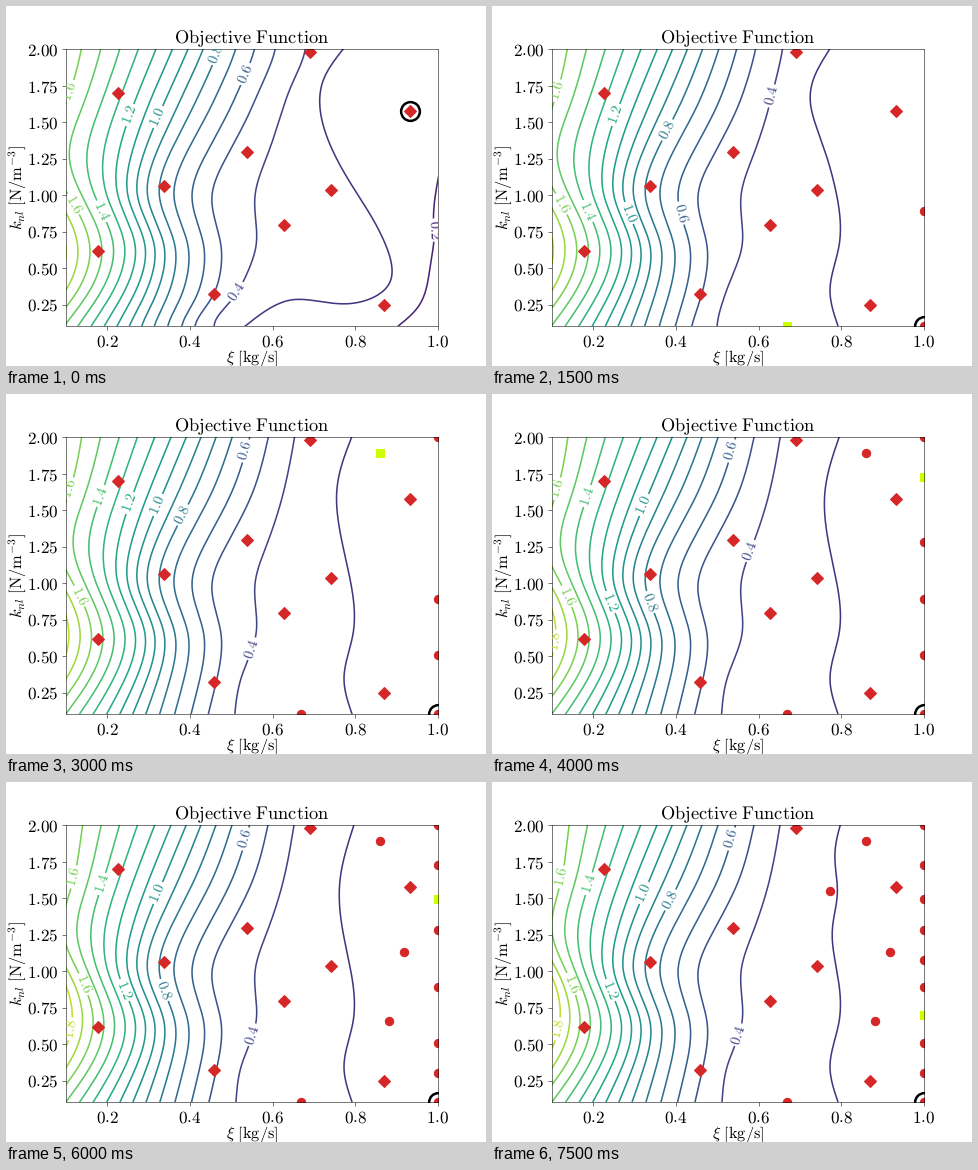
These frames come from a looping animation (480x360 px, 8000 ms). A matplotlib script:

```python
import numpy as np
import matplotlib.pyplot as plt
from matplotlib.animation import FuncAnimation

plt.rcParams.update({
    "mathtext.fontset": "cm", "text.hinting": "none", "axes.linewidth": .5,
    "xtick.major.width": .5, "ytick.major.width": .5})

FRAMES, INTERVAL = 16, 500
RED, LIME = "tab:red", "#ccff00"

# Initial samples, then the points proposed one per step (xi, k).
SAMPLES = [(.226, 1.70), (.691, 1.981), (.932, 1.576), (.539, 1.295),
           (.336, 1.059), (.740, 1.035), (.628, .795), (.1774, .617),
           (.459, .322), (.869, .247)]
PROPOSED = [(1, .1), (1, .89), (.669, .1), (1, 2), (1, .507), (.860, 1.895),
            (1, 1.285), (1, 1.727), (.8815, .66), (.918, 1.131), (1, .30),
            (1, 1.496), (.7726, 1.547), (1, 1.075), (1, .696)]

# Where a few guide contours cross these heights, in pixels.
HEIGHTS = [43, 100, 150, 190, 240, 285, 320]
GUIDES = {
    .3: [348, 334, 337, 345, 347, 338, 346],
    .4: [288, 277, 261, 249, 250, 235, 230],
    .5: [262, 246, 221, 206, 215, 211, 203],
    .7: [226, 205, 179, 168, 182, 178, 169],
    1.1: [165, 142, 125, 122, 139, 130, 114],
    1.6: [76, 64, 53, 69, 86, 72, 46]}
STEEP = [.5, .7, 1.1, 1.6]

# Contours of the first surface that turn back on themselves.
BENDS = {
    .3: [(238, 321), (285, 294), (345, 297.5), (384, 276), (378, 235),
         (345, 178), (317, 75), (338, 42)],
    .2: [(391, 321), (414, 298), (425, 255), (428, 232), (427.5, 215),
         (433, 168)]}

# Label heights per level; each entry holds until a later step moves it.
LABELS = {
    0: {.2: [224], .4: [286], .6: [68], .8: [48], 1.0: [111], 1.2: [109],
        1.4: [205], 1.6: [85, 198]},
    2: {.4: [90], .6: [207], .8: [124], 1.0: [207]},
    5: {.4: [255], .6: [57], .8: [121], 1.0: [111], 1.4: [102], 1.6: [95, 202]},
    7: {.4: [157], .8: [208], 1.2: [208], 1.8: [247]},
    11: {.4: [253]},
    14: {.8: [118]}}

YS = np.linspace(41, 322, 563)


def spline(t, v, s):
    """Natural cubic spline through v (one column per curve) at s."""
    t, n = np.asarray(t, float), len(t)
    v = np.asarray(v, float).reshape(n, -1)
    h = np.diff(t)
    a, rhs = np.eye(n), np.zeros_like(v)
    for i in range(1, n - 1):
        a[i, i - 1:i + 2] = h[i - 1], 2 * (h[i - 1] + h[i]), h[i]
        rhs[i] = 6 * ((v[i + 1] - v[i]) / h[i] - (v[i] - v[i - 1]) / h[i - 1])
    m = np.linalg.solve(a, rhs)
    j = np.clip(np.searchsorted(t, s, side="right") - 1, 0, n - 2)
    p = ((t[j + 1] - s) / h[j])[:, None]
    q, hh = 1 - p, (h[j] ** 2 / 6)[:, None]
    return p * v[j] + q * v[j + 1] + hh * ((p**3 - p) * m[j] + (q**3 - q) * m[j + 1])


def bend(points):
    points = np.array(points, float)
    t = np.r_[0, np.cumsum(np.hypot(*np.diff(points, axis=0).T))]
    return spline(t, points, np.linspace(0, t[-1], 600)).T


def bump(center, width):
    return np.exp(-((YS - center) / width) ** 2)


def base_lines():
    """Settled contours as {level: x at YS}."""
    levels = np.arange(5, 19) / 10
    table = spline(STEEP, [GUIDES[v] for v in STEEP], levels)
    rows = [GUIDES[.3], GUIDES[.4], *table]
    xs = spline(HEIGHTS, np.transpose(rows), YS).T
    return dict(zip([.3, .4, *levels], xs))


BASE = base_lines()


def contours(step):
    """All contour lines of one step as (level, x, y) in pixels."""
    age = 0 if step < 2 else step
    settle, drift = np.exp(-age / 2), age - 8
    lines = []
    for level, x in BASE.items():
        if level == .3:
            x = x - 80 * settle * bump(80, 50) + 12 * (step > 13) * bump(110, 35)
        else:
            # the flat side swings into place, the steep side keeps drifting
            x = x + settle / level**2 * (1.8 * bump(43, 35) - 3.5 * bump(320, 25))
            x += drift * (max(level - 1.2, 0) / .4) ** 1.6 * bump(150, 80)
        if age or level not in BENDS:
            lines.append((level, x, YS))
    if not age:
        lines += [(level, *bend(points)) for level, points in BENDS.items()]
    return lines


def labels_at(step):
    found = {}
    for start, heights in LABELS.items():
        if step >= start:
            found.update(heights)
    return found


def to_data(x, y):
    return .1 + (x - 60) * .9 / 372, .1 + (320.4 - y) * 1.9 / 277.2


fig, ax = plt.subplots(figsize=(6.4, 4.8), dpi=75)
fig.subplots_adjust(left=.125, right=.9, bottom=.11, top=.88)
ax.set(xlim=(.1, 1), ylim=(.1, 2))
xticks, yticks = np.arange(1, 6) / 5, np.arange(1, 9) / 4
ax.set_xticks(xticks, [f"${v:.1f}$" for v in xticks], fontsize=16.4)
ax.set_yticks(yticks, [f"${v:.2f}$" for v in yticks], fontsize=16.4)
ax.set_title(r"$\mathrm{Objective\ Function}$", fontsize=17.6)
ax.set_xlabel(r"$\xi\ [\mathrm{kg/s}]$", fontsize=15.6, labelpad=-1.8)
ax.set_ylabel(r"$k_{nl}\ [\mathrm{N/m^{-3}}]$", fontsize=15.8, labelpad=-2.2)

artists = []


def mark(points, marker, fill, size=8, **style):
    if points:
        artists.extend(ax.plot(*zip(*points), marker, color=fill, ms=size,
                               zorder=2.1, **style))


def draw_contour(level, x, y, heights):
    color = plt.cm.viridis(level / 2)
    keep = np.ones(len(x), bool)
    for height in heights:
        i = int(np.argmin(abs(y - height)))
        lo, hi = max(i - 10, 0), min(i + 10, len(x) - 1)
        angle = np.degrees(np.arctan2(y[lo] - y[hi], x[hi] - x[lo]))
        keep &= np.hypot(x - x[i], y - y[i]) > 11.5
        artists.append(ax.text(*to_data(x[i], y[i]), f"${level:.1f}$",
                               color=color, fontsize=14,
                               rotation=(angle + 90) % 180 - 90,
                               ha="center", va="center", clip_on=True))
    artists.extend(ax.plot(*to_data(np.where(keep, x, np.nan), y), lw=1.5,
                           color=color, solid_capstyle="butt"))


def update(step):
    while artists:
        artists.pop().remove()
    labels = labels_at(step)
    for level, x, y in contours(step):
        draw_contour(level, x, y, labels.get(level, []))
    mark(SAMPLES, "D", RED)
    mark(PROPOSED[:max(step - 1, 0)], "o", RED)
    if step:
        mark([PROPOSED[step - 1]], "s", LIME)
    best = SAMPLES[2] if step < 2 else PROPOSED[0]
    mark([best], "o", "black", 18, mfc="none", mew=2.4)
    return artists


anim = FuncAnimation(fig, update, frames=FRAMES, interval=INTERVAL,
                     init_func=lambda: [], repeat=True, repeat_delay=0)
plt.show()
```
